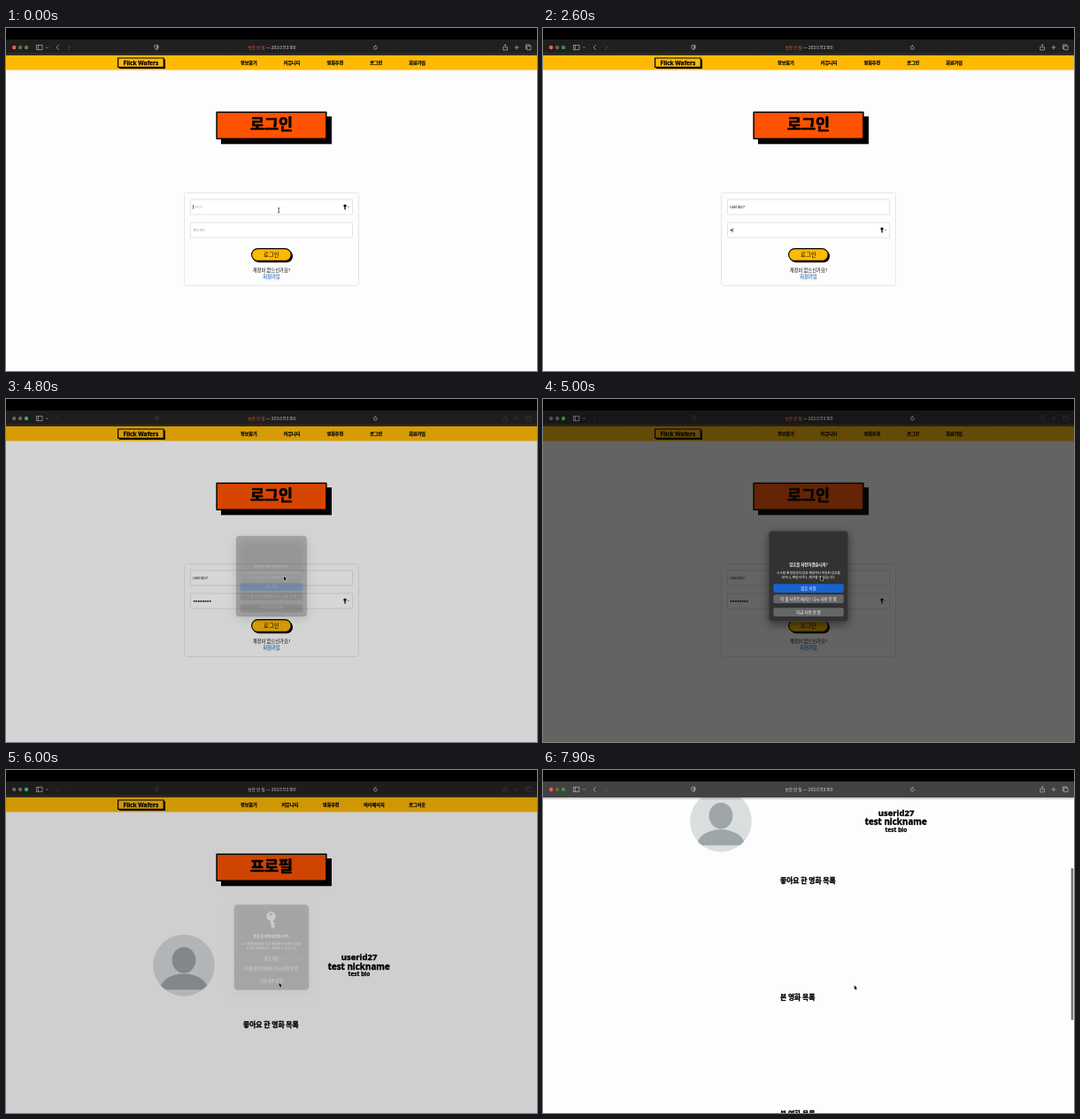
Recreate the animation shown at these times as an HTML page with a canvas. Size 600x388 px, loop 8 s.

```html
<!DOCTYPE html>
<html lang="ko">
<head>
<meta charset="utf-8">
<title>Login</title>
<style>
html, body { margin: 0; width: 100%; height: 100%; overflow: hidden; background: #000; }
canvas { display: block; width: 600px; height: 388px; }
</style>
</head>
<body>
<canvas id="stage"></canvas>
<script>
const W = 600, H = 388, LOOP = 8000, STEP = 100;
const BAR_TOP = 13, PAGE_TOP = 31, BAR_MID = 22;
const YELLOW = '#ffb905', ORANGE = '#ff5200', PAPER = '#fdfdfd';
const KR = '"Noto Sans CJK KR", "Noto Sans CJK", "Noto Sans", sans-serif';
const LATIN = '"Noto Sans", "Open Sans", sans-serif';
const UI = 'Inter, "Noto Sans CJK KR", "Noto Sans CJK", sans-serif';
const HOST = '203.0.113.100', USER = 'userId27';

// Moments of the story, in ms
const ID_START = 300, PASS_START = 2600, PASS_FOCUS = 2200, SUBMIT = 4700;
const DISMISS = 5700, LOADED = 5900, SCROLL_START = 6800;

const canvas = document.getElementById('stage');
const c = canvas.getContext('2d');
const ratio = window.devicePixelRatio || 1;
canvas.width = W * ratio;
canvas.height = H * ratio;

const clamp = (v, lo = 0, hi = 1) => Math.min(hi, Math.max(lo, v));
const lerp = (a, b, k) => a + (b - a) * k;
const ramp = (t, from, to) => clamp((t - from) / (to - from));
const smooth = (t, from, to) => { const u = ramp(t, from, to); return u * u * (3 - 2 * u); };
const smoother = (t, from, to) => { const u = ramp(t, from, to); return u ** 3 * (u * (u * 6 - 15) + 10); };
const typedCount = (t, start, gap) => clamp(Math.floor((t - start) / gap) + 1, 0, USER.length);

function rect(x, y, w, h, fill) {
  c.fillStyle = fill;
  c.fillRect(x, y, w, h);
}

function round(x, y, w, h, r, fill, stroke, width = 1) {
  c.beginPath();
  c.roundRect(x, y, w, h, r);
  if (fill) { c.fillStyle = fill; c.fill(); }
  if (stroke) { c.strokeStyle = stroke; c.lineWidth = width; c.stroke(); }
}

function disc(x, y, rx, fill, ry = rx) {
  c.beginPath();
  c.ellipse(x, y, rx, ry, 0, 0, Math.PI * 2);
  c.fillStyle = fill;
  c.fill();
}

// Strokes an icon path drawn around its own centre.
function icon(path, x, y, color, width = 0.7) {
  c.save();
  c.translate(x, y);
  c.strokeStyle = color;
  c.lineWidth = width;
  c.stroke(new Path2D(path));
  c.restore();
}

function setFont(size, font, weight) {
  c.font = `${weight} ${size}px ${font}`;
}

// y is the optical middle of the line.
function text(str, x, y, size, o = {}) {
  const { color = '#000', weight = 400, font = UI, align = 'center', fat = 0 } = o;
  setFont(size, font, weight);
  c.textAlign = align;
  c.fillStyle = color;
  const base = y + size * 0.36;
  c.fillText(str, x, base);
  if (fat) {
    c.strokeStyle = color;
    c.lineWidth = fat;
    c.lineJoin = 'round';
    c.strokeText(str, x, base);
  }
  return c.measureText(str).width;
}

const heavy = (str, x, y, size, align = 'center', font = KR) =>
  text(str, x, y, size, { weight: 900, font, align, fat: size * 0.04 });

// Menu entries share the free space evenly.
function menu(labels, left, right, y, size) {
  setFont(size, KR, 900);
  const widths = labels.map(s => c.measureText(s).width);
  const gap = (right - left - widths.reduce((a, b) => a + b)) / (labels.length - 1);
  let x = left;
  labels.forEach((label, i) => {
    heavy(label, x, y, size, 'left');
    x += widths[i] + gap;
  });
}

function header(account) {
  rect(0, PAGE_TOP, W, 16.5, YELLOW);
  rect(128, 35.5, 52, 10.5, '#000');
  round(126.6, 34, 51.6, 10.3, 0, YELLOW, '#000', 1.2);
  heavy('Flick Wafers', 152.4, 39.2, 6.6, 'center', LATIN);
  menu(['정보찾기', '커뮤니티', '영화추천', ...account], 265, 474, 39, 5.1);
}

function banner(label) {
  rect(243, 100, 125, 31.3, '#000');
  round(238.1, 95.3, 123.8, 30, 0, ORANGE, '#000', 1.5);
  heavy(label, 300, 108.6, 17.4);
}

function keyGlyph(y) {
  disc(383, y - 1.2, 1.7, '#111');
  rect(382.4, y, 1.4, 3.2, '#111');
  icon('M-1 -.5L0 .5L1 -.5', 386.8, y, '#444');
}

function field(y, hint) {
  round(208.5, y, 183, 17, 0.5, '#fff', '#dcdcdc', 0.8);
  text(hint, 211.6, y + 8.5, 3.7, { color: '#999', align: 'left' });
}

function loginPage(t) {
  header(['로그인', '회원가입']);
  banner('로그인');
  round(201.5, 186.5, 197, 105, 3, null, '#e2e2e2', 0.9);

  const typed = USER.slice(0, typedCount(t, ID_START, 243));
  const dots = typedCount(t, PASS_START, 200);
  const onId = t < PASS_FOCUS, pitch = 2.57;
  field(194, typed ? '' : '아이디');
  field(220, dots ? '' : '패스워드');
  const idWidth = text(typed, 211.3, 202.6, 4, { align: 'left', color: '#111' });
  for (let i = 0; i < dots; i++) disc(212.7 + i * pitch, 228.7, 0.95, '#111');
  if (onId) rect(211 + idWidth, 200, 0.6, 5, '#222');
  else if (t < 4500) rect(211.6 + dots * pitch, 226.2, 0.6, 5, '#222');
  keyGlyph(onId ? 202.3 : 228.3);

  round(279, 251.2, 45, 14, 7, '#000');
  round(277.6, 249.6, 44.6, 13.8, 6.9, YELLOW, '#000', 1.1);
  text('로그인', 299.8, 256.8, 6.3, { weight: 500, font: KR });
  text('계정이 없으신가요?', 300, 274, 5.3, { weight: 500, font: KR });
  c.save();
  c.shadowColor = 'rgba(60,130,220,.6)';
  c.shadowBlur = 2 * ratio;
  c.shadowOffsetY = ratio;
  text('회원가입', 300, 281, 5.3, { color: '#2f6cad', font: KR });
  c.restore();
}

function avatar(x, y) {
  const r = 34.8, skin = '#9fa6a9';
  c.save();
  disc(x, y, r, '#dadedf');
  c.clip();
  disc(x, y - 6, 13.4, skin, 14.8);
  c.beginPath();
  c.ellipse(x, y + 27.5, 27, 18, 0, Math.PI, 0);
  c.fill();
  c.restore();
}

function profilePage(scroll) {
  c.save();
  c.translate(0, -scroll);
  header(['마이페이지', '로그아웃']);
  banner('프로필');
  avatar(201, 221);
  heavy(USER.toLowerCase(), 399, 211.6, 9.5, 'center', LATIN);
  heavy('test nickname', 398.7, 222, 9.8, 'center', LATIN);
  heavy('test bio', 399, 231, 6.6, 'center', LATIN);
  ['좋아요 한', '본', '본'].forEach((kind, i) =>
    heavy(`${kind} 영화 목록`, 268, 288 + i * 132, 7.8, 'left'));
  c.restore();
}

function fadeDown(y, h, color, from, to) {
  const g = c.createLinearGradient(0, y, 0, y + h);
  g.addColorStop(0, `rgba(${color},${from})`);
  g.addColorStop(1, `rgba(${color},${to})`);
  rect(0, y, W, h, g);
}

function address(loaded) {
  const warn = '보안 안 됨', rest = ' — ' + HOST, size = 4.5, white = '#dedede';
  setFont(size, UI, 400);
  const x = 300.5 - c.measureText(warn + rest).width / 2;
  const w = text(warn, x, BAR_MID, size, { color: loaded ? white : '#f0603a', align: 'left' });
  text(rest, x + w, BAR_MID, size, { color: white, align: 'left' });
}

function toolbar(scroll, modal, loaded) {
  // the bar is translucent: the yellow header, then white paper, passes below
  const gray = lerp(31, 66, clamp(scroll / 50));
  const warm = Math.sin(Math.PI * clamp(scroll / 40));
  rect(0, 0, W, BAR_TOP, '#000');
  rect(0, BAR_TOP, W, PAGE_TOP - BAR_TOP, `rgb(${gray},${gray},${gray})`);
  rect(0, BAR_TOP, W, PAGE_TOP - BAR_TOP, `rgba(84,60,10,${0.4 * warm})`);
  fadeDown(27, 4, '80,62,20', 0, 0.6 * (1 - clamp(scroll / 50)));
  if (scroll > 0) fadeDown(PAGE_TOP, 3, '0,0,0', 0.28, 0);

  const lights = modal ? ['#6b6b6b', '#6b6b6b', '#35c64b'] : ['#ec6152', '#6f6638', '#3d8f47'];
  lights.forEach((color, i) => disc(9.2 + i * 6.9, BAR_MID, 2.2, color));

  const on = '#b9b9b9', off = modal ? '#3b3b3b' : on;
  const put = (path, x, color) => icon(path, x, BAR_MID, color);
  put('M-3 -2.6h6.6v5.2h-6.6zM-1 -2.6v5.2', 37.4, on);
  put('M-1.2 -.6L0 .6L1.2 -.6', 46.4, on);
  put('M1.3 -2.8L-1.3 0L1.3 2.8', 58.3, off);
  put('M-1.3 -2.8L1.3 0L-1.3 2.8', 71.3, modal ? '#333' : '#5e5e5e');
  put('M0 -3L2.3 -2.1Q2.4 1.6 0 3Q-2.4 1.6 -2.3 -2.1zM.6 -2v4M1.4 -1.8v3', 170, off);
  put('M1.8 -.6A1.9 1.9 0 1 1 0 -1.7M-.2 -2.8L1.1 -1.7L-.2 -.7', 417.3, on);
  put('M-1.2 -.6h-1.2v3.6h4.8v-3.6h-1.2M0 1v-4.4M-1.3 -2.1L0 -3.4L1.3 -2.1', 564.2, off);
  put('M-2.6 0h5.2M0 -2.6v5.2', 577, off);
  put('M-1.4 1.4h-1.2v-4.5h4.4v1.3M-1.3 -1.7h4.4v4.4h-4.4z', 590, off);
  address(loaded);
}

function dim(k) {
  rect(0, BAR_TOP, W, PAGE_TOP - BAR_TOP, `rgba(0,0,0,${0.25 * k})`);
  rect(0, PAGE_TOP, W, H - PAGE_TOP, `rgba(10,10,9,${0.63 * k})`);
}

function bigKey(alpha) {
  c.save();
  c.globalAlpha *= alpha;
  c.translate(299.5, 163);
  c.rotate(-0.15);
  c.fillStyle = '#e6e6e6';
  c.beginPath();
  c.arc(0, 0, 5.6, 0, Math.PI * 2);
  c.arc(0, -2.3, 1.5, 0, Math.PI * 2, true);
  c.fill();
  c.fillRect(-1.6, 5, 3.2, 9.5);
  c.fillRect(1, 8, 2, 1.8);
  c.fillRect(1, 11.4, 2, 1.8);
  c.restore();
}

function dialog(t) {
  const enter = smooth(t, SUBMIT, SUBMIT + 300);
  const leave = smooth(t, DISMISS + 50, DISMISS + 600);
  const alpha = enter * (1 - leave);
  if (!alpha) return;
  const pale = smooth(t, DISMISS, DISMISS + 300);
  const gray = (a, b) => { const v = lerp(a, b, pale); return `rgb(${v},${v},${v})`; };
  const scale = lerp(0.85, 1, enter - leave * 0.98);

  c.save();
  c.globalAlpha = alpha;
  c.translate(300, 200.4);
  c.scale(scale, scale);
  c.translate(-300, -200.4);
  c.shadowColor = `rgba(0,0,0,${lerp(0.5, 0.1, pale)})`;
  c.shadowBlur = 11 * ratio;
  c.shadowOffsetY = 3 * ratio;
  round(255.2, 149.2, 89.6, 102.6, 4, gray(50, 141));
  c.shadowColor = 'transparent';
  round(255.4, 149.4, 89.2, 102.2, 4, null, gray(80, 150), 0.5);
  bigKey(smooth(t, 5000, 5400));

  const white = { color: '#fff', font: KR };
  text('암호를 저장하겠습니까?', 300, 187.8, 4.4, { ...white, weight: 700 });
  text('시스템 환경설정의 암호 패널에서 저장된 암호를', 300, 196.5, 3.7, white);
  text('보거나, 편집하거나, 제거할 수 있습니다.', 300, 201.6, 3.7, white);
  const button = (label, y, fill) => {
    round(260.3, y, 79.4, 9.8, 2, fill);
    text(label, 300, y + 4.8, 4.5, { ...white, weight: 500 });
  };
  const plain = gray(102, 170);
  button('암호 저장', 209.2, pale ? plain : '#1763d2');
  button('이 웹 사이트에서는 다시 사용 안 함', 221.2, plain);
  button('지금 사용 안 함', 236.2, plain);
  c.restore();
}

function scrollbar(scroll, alpha) {
  const share = 0.486;
  c.globalAlpha = alpha;
  round(596.7, PAGE_TOP + 0.7 + scroll * share, 2.6, 172, 1.3, '#777');
  c.globalAlpha = 1;
}

function pointer(t) {
  if (t < ID_START) icon('M-1.2 -2.8L0 -2.2L1.2 -2.8M0 -2.2v4.4M-1.2 2.8L0 2.2L1.2 2.8', 308.2, 206.2, '#222');
  if (t <= SUBMIT) return;
  const toButton = smooth(t, 5100, 5500), toPage = smooth(t, 6600, 6900);
  c.save();
  c.translate(313.8 - 5.2 * toButton + 43.2 * toPage, 200.5 + 40.3 * toButton + 2.8 * toPage);
  const arrow = new Path2D('M0 0v4.6l1.1 -.9l.7 1.6l.8 -.3l-.7 -1.6l1.4 -.1z');
  c.strokeStyle = '#fff';
  c.lineWidth = 0.7;
  c.stroke(arrow);
  c.fillStyle = '#000';
  c.fill(arrow);
  c.restore();
}

function draw(t) {
  const loaded = t >= LOADED;
  const scroll = 164 * smoother(t, SCROLL_START, LOOP);
  const shade = smooth(t, SUBMIT, SUBMIT + 300) * (1 - ramp(t, DISMISS, DISMISS + 660)) ** 2;
  c.setTransform(ratio, 0, 0, ratio, 0, 0);
  rect(0, 0, W, H, PAPER);
  if (loaded) profilePage(scroll);
  else loginPage(t);
  toolbar(scroll, t > SUBMIT && t < 6200, loaded);
  dim(shade);
  dialog(t);
  scrollbar(scroll, smooth(t, 6600, 6900));
  pointer(t);
}

function frame(now) {
  draw(Math.floor((now % LOOP) / STEP) * STEP);
  requestAnimationFrame(frame);
}
requestAnimationFrame(frame);
</script>
</body>
</html>
```
